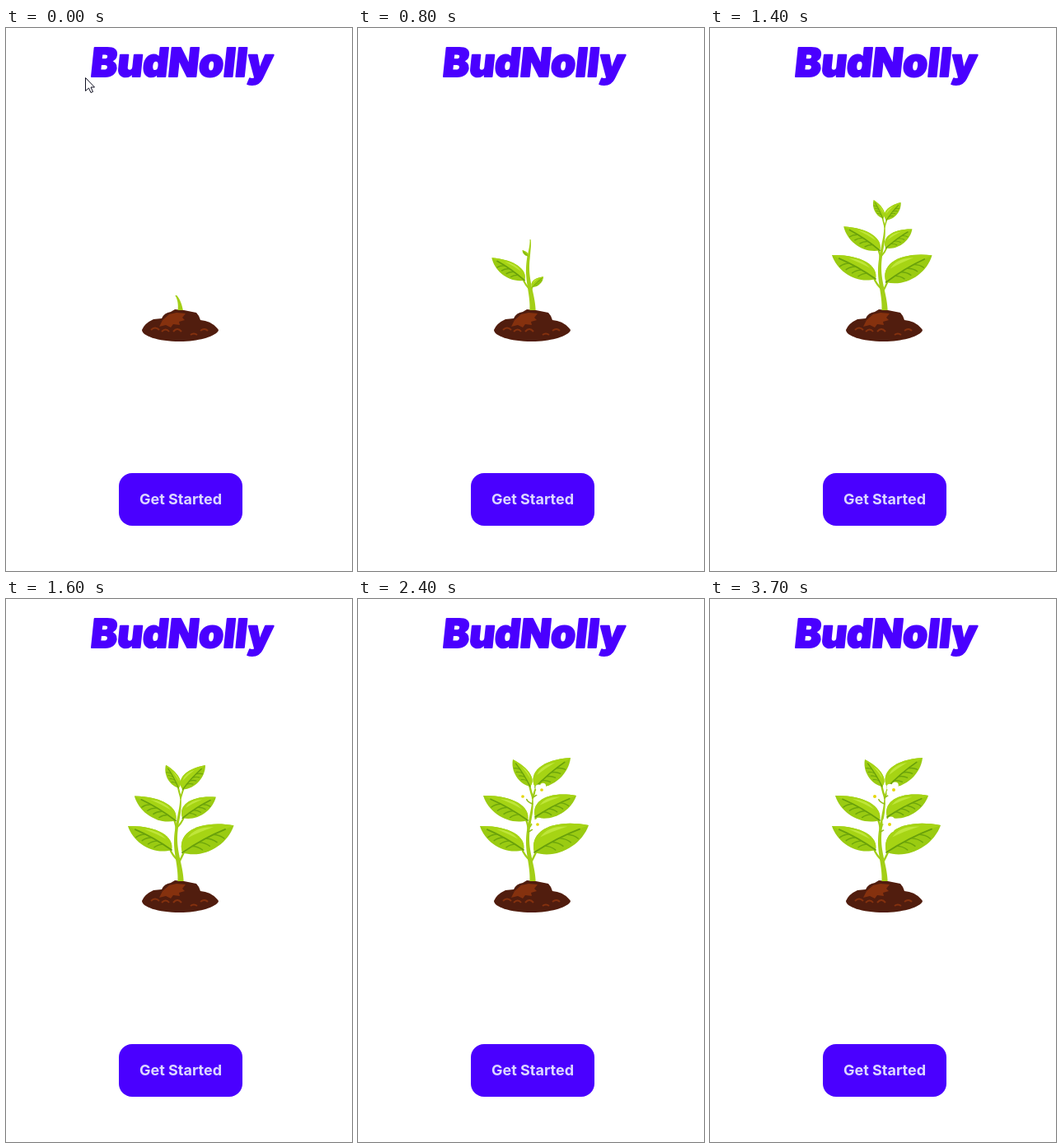
Write an HTML page with a canvas that moves like this. It is 420x660 px and loops after 3800 ms.

```html
<!DOCTYPE html>
<html lang="en">
<head>
<meta charset="utf-8">
<title>Growing plant</title>
<style>
  html, body { margin: 0; width: 100%; height: 100%; overflow: hidden; background: #fff; }
  svg, canvas { position: absolute; left: 0; top: 0; }
  text { font-family: Inter, sans-serif; text-anchor: middle; }
  .title { font-size: 48px; font-weight: 900; fill: #4a00ff;
           stroke: #4a00ff; stroke-width: 2; stroke-linejoin: round; }
  .label { font-size: 18px; font-weight: 700; fill: #ddd8ff; }
</style>
</head>
<body>
<svg width="420" height="660">
  <text class="title" transform="translate(212 59) skewX(-6)">BudNolly</text>
  <rect x="137" y="541" width="150" height="64" rx="16" fill="#4a00ff"/>
  <text class="label" x="212" y="579">Get Started</text>
  <path fill="#511d0e" d="M165 367Q168 359 179 354L189 353Q192 346 200 345L205 342L216 343L231 346Q235 350 236 355Q250 356 258 367C258 372 240 381 211 381C184 381 165 374 165 367Z"/>
  <path fill="#85310e" d="M190 355L198 348L207 346L218 347L214 352L217 355L210 357L211 361L203 360L200 364L194 361L186 363Z"/>
  <path fill="none" stroke="#85310e" stroke-width="2" d="M176 367q5-5 10 0M189 369q5-5 9 0M203 369q5-6 10 0M224 373q4-3 8 0M236 368q5-4 9 0"/>
  <path id="cursor" d="M96.5 60.5V76.5L100.5 73L103 78.5L105.5 77.5L103 72H107.5Z" fill="#fff" stroke="#111122"/>
</svg>
<canvas id="plant" width="420" height="660"></canvas>
<script>
const LOOP = 3800, STEP = 100;
const SOIL_Y = 343, SPROUT_Y = 325, STEM_TOP = 237;
const ctx = document.getElementById('plant').getContext('2d');
const cursor = document.getElementById('cursor');

// Full-grown leaves, from the lowest pair to the highest
const LEAVES = [
  { start: 200, base: [201, 305], tip: [148, 276] },
  { start: 670, base: [214, 308], tip: [280, 275] },
  { start: 720, base: [206, 269], tip: [152, 239] },
  { start: 920, base: [215, 265], tip: [265, 239] },
  { start: 1020, base: [209, 228], tip: [188, 195] },
  { start: 1120, base: [215, 229], tip: [258, 193] },
];
const FLOWERS = [
  { x: 223, y: 232, size: 9.5 },
  { x: 200, y: 240, size: 7 },
  { x: 218, y: 274, size: 9.5 },
];

const mix = (a, b, k) => a + (b - a) * k;
const stemX = y => 209 - 3 * Math.cos((y - 293) / 50 * Math.PI);
const stemWidth = y => 2.8 + 4.4 * ((y - STEM_TOP) / (SOIL_Y - STEM_TOP)) ** 2;

// Progress 0..1, slowing towards the end
function growth(t, start, duration) {
  const k = Math.min(1, Math.max(0, (t - start) / duration));
  return 1 - (1 - k) ** 2;
}

function curve(color, width, x, y, cx, cy, ex, ey) {
  ctx.strokeStyle = color;
  ctx.lineWidth = width;
  ctx.beginPath();
  ctx.moveTo(x, y);
  ctx.quadraticCurveTo(cx, cy, ex, ey);
  ctx.stroke();
}

function disc(color, x, y, r) {
  ctx.fillStyle = color;
  ctx.beginPath();
  ctx.arc(x, y, r, 0, 2 * Math.PI);
  ctx.fill();
}

function drawStem(t) {
  const p = growth(t, 0, 1500), top = mix(SPROUT_Y, STEM_TOP, p);
  const left = [], right = [];
  for (let y = SOIL_Y; y >= top; y--) {
    const x = stemX(y) - 4 * (1 - p ** 3) * Math.exp((top - y) / 7);
    const half = stemWidth(y) / 2 * Math.min(1, .35 + (y - top) / 35);
    left.push([x - half, y]);
    right.unshift([x + half, y]);
  }
  ctx.fillStyle = '#a3cf17';
  ctx.beginPath();
  left.concat(right).forEach(point => ctx.lineTo(...point));
  ctx.fill();
}

function drawLeaf({ start, base, tip }, t) {
  const p = growth(t, start, 1200);
  if (!p) return;
  const side = Math.sign(tip[0] - base[0]);
  const fullX = tip[0] - base[0], fullY = tip[1] - base[1];

  // The base moves out from the stem; a young leaf points more steeply upwards
  const joinY = base[1] + 13, joinX = stemX(joinY);
  const out = Math.sqrt(p);
  const x = mix(joinX, base[0], out), y = mix(joinY, base[1], out);
  const dx = fullX * p;
  const dy = fullY * p - .5 * Math.hypot(fullX, fullY) * p * (1 - p);
  const length = Math.hypot(dx, dy);
  curve('#a0ce16', mix(1, 2.4, p), joinX, joinY, x - side, mix(y, joinY, .5), x + dx * .04, y + dy * .04);

  // Unit space: x runs from base to tip, y towards the upper edge
  ctx.save();
  ctx.transform(dx, dy, side * dy, -side * dx, x, y);
  const up = side < 0 ? .28 : .36;
  ctx.beginPath();
  ctx.moveTo(0, 0);
  ctx.bezierCurveTo(.08, up, .52, up, 1, 0);
  ctx.bezierCurveTo(.74, -.25, .27, -.27, 0, 0);
  ctx.fillStyle = '#9acb12';
  ctx.fill();

  ctx.fillStyle = '#a6d414';
  ctx.beginPath();
  ctx.moveTo(0, 0);
  ctx.bezierCurveTo(.08, up, .52, up, 1, 0);
  ctx.quadraticCurveTo(.5, .05, 0, 0);
  ctx.fill();

  ctx.fillStyle = '#bfe63a';
  ctx.beginPath();
  ctx.moveTo(.2, up * .5);
  ctx.quadraticCurveTo(.4, up * .82, .68, up * .38);
  ctx.quadraticCurveTo(.42, up * .5, .2, up * .5);
  ctx.fill();

  if (length > 10) {
    const vein = Math.min(1.4, length / 35) / length;
    curve('#689f0b', vein * 1.2, 0, 0, .45, .05, .84, .01);
    for (let root = .2; root < .65; root += .14) {
      curve('#6da50c', vein, root, .02, root + .09, -.03, root + .13, -.12);
    }
  }
  ctx.restore();
}

function drawFlower({ x, y, size }, t) {
  const p = growth(t, 1800, 900), r = size * p;
  if (!p) return;
  const rootY = y + 9, rootX = stemX(rootY);
  curve('#91bc18', 1.6, rootX, rootY, mix(rootX, x, .5), rootY - 2, mix(rootX, x, .6), mix(rootY, y, .6));
  for (let i = 0; i < 5; i++) {
    const angle = (i * .4 - .4) * Math.PI;
    disc('#fff', x + Math.cos(angle) * r * .6, y + Math.sin(angle) * r * .6, r * .42);
  }
  disc('#fff', x, y, r * .5);
  disc('#e5d70b', x, y, mix(.8, 2, p));
}

function render(now) {
  const t = Math.floor(now % LOOP / STEP) * STEP;
  cursor.style.display = t < STEP ? '' : 'none';
  ctx.clearRect(0, 0, 420, 660);
  drawStem(t);
  LEAVES.forEach(leaf => drawLeaf(leaf, t));
  FLOWERS.forEach(flower => drawFlower(flower, t));
}

let start;
function tick(now) {
  start ??= now;
  render(now - start);
  requestAnimationFrame(tick);
}
ctx.lineCap = 'round';
render(0);
requestAnimationFrame(tick);
</script>
</body>
</html>
```
